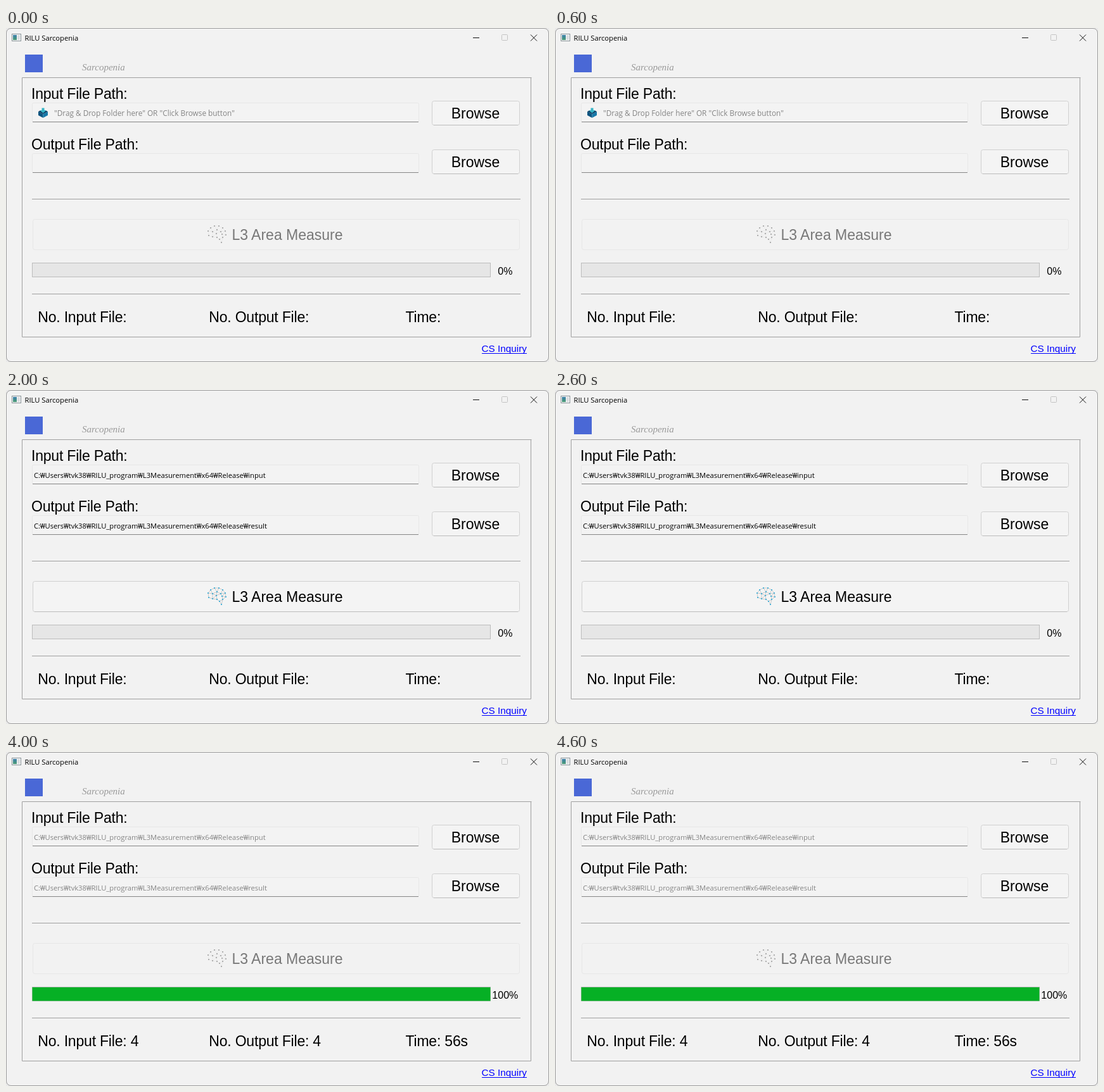
An HTML page for the animation above (5 s loop, 857 by 528 pixels).

```html
<!DOCTYPE html>
<html lang="en">
<head>
<meta charset="utf-8">
<title>Area measurement tool</title>
<style>
  html, body { margin: 0; width: 100%; height: 100%; overflow: hidden; background: #e9e9e9; }
  svg { display: block; width: 857px; height: 528px; font: 23px "Liberation Sans", Arial, sans-serif; }
  .ui { font-family: "Open Sans", "Noto Sans", sans-serif; }
  .label { letter-spacing: -.2px; }
  .path { font-size: 11.2px; }
  .rule { stroke: #a0a0a0; fill: none; }
  .field rect { fill: #f3f3f3; stroke: #e7e7e7; }
  .field path { stroke: #868686; }
  .button { text-anchor: middle; }
  .button rect { fill: #f4f4f4; stroke: #d0d0d0; }
  .button path { stroke: #bcbcbc; }
  .button.off { fill: #787878; }
  .button.off rect { fill: #f2f2f2; stroke: #e7e7e7; }
  .button.off path { stroke: #e7e7e7; }
  #brain { stroke: #1ba6d8; fill: #1ba6d8; stroke-width: .8; }
  .off #brain { stroke: #9b9b9b; fill: #9b9b9b; }
</style>
</head>
<body>
<svg viewBox="0 0 857 528">
  <defs>
    <linearGradient id="pane" x2="0" y2="1">
      <stop stop-color="#3d7fae"/><stop offset="1" stop-color="#4b9b72"/>
    </linearGradient>
    <linearGradient id="sheen" gradientUnits="userSpaceOnUse" x1="160" y1="388" x2="204" y2="376">
      <stop stop-color="#06b025"/><stop offset="1" stop-color="#66dd72"/>
    </linearGradient>
  </defs>

  <!-- window and title bar -->
  <rect x=".5" y=".5" width="856" height="527" rx="7.5" fill="#f2f2f2" stroke="#9c9c9c"/>
  <rect x="9.5" y="9.5" width="14" height="11" fill="#fafafa" stroke="#8a9499"/>
  <rect x="11" y="11" width="6" height="8" fill="url(#pane)"/>
  <rect x="18" y="11" width="4" height="8" fill="#d9dde0"/>
  <text class="ui" x="29.5" y="20" font-size="11.2">RILU Sarcopenia</text>
  <g fill="none" stroke="#111">
    <path d="M737 15.5h10M828 10.5l10 10m0-10l-10 10"/>
    <rect x="782.5" y="10.5" width="9" height="9" rx="1" stroke="#c3c3c3"/>
  </g>

  <!-- heading -->
  <rect x="30" y="42" width="28" height="28" fill="#4a68d6"/>
  <text x="120" y="67" fill="#9a9a9a" style="font:italic 15px 'Liberation Serif',serif">Sarcopenia</text>

  <path class="rule" d="M25.5 78.5H829.5M25.5 78.5V488.5H828.5V78.5M41 270.5H812M41 420.5H812"/>

  <text class="label" x="40" y="112">Input File Path:</text>
  <text class="label" x="40" y="192">Output File Path:</text>
  <g class="field">
    <rect x="41.5" y="118.5" width="610" height="30" rx="2"/><path d="M42 148.5H651"/>
    <rect x="41.5" y="198.5" width="610" height="30" rx="2"/><path d="M42 228.5H651"/>
  </g>
  <g id="hint">
    <path d="M51 132l7.500 4v6l-7.500-4z" fill="#0b5480"/>
    <path d="M66 132l-7.500 4v6l7.500-4z" fill="#1678a8"/>
    <path d="M51 132l3-1.500 4.500 3 4.500-3 3 1.500-7.500 4z" fill="#0a3f66"/>
    <path d="M56.500 126.500h4v3.500h3l-5 4.500-5-4.500h3z" fill="#35b5c6"/>
    <text class="ui" x="76" y="138.500" font-size="11.8" fill="#858585">"Drag &amp; Drop Folder here" OR "Click Browse button"</text>
  </g>
  <text class="ui path" id="input" x="44" y="138.500"/>
  <text class="ui path" id="output" x="44" y="218.500"/>

  <g class="button browse">
    <rect x="672.5" y="115.5" width="138" height="38" rx="3"/><path d="M675 153.5H808"/>
    <text x="741" y="143">Browse</text>
  </g>
  <g class="button browse">
    <rect x="672.5" y="192.5" width="138" height="38" rx="3"/><path d="M675 230.5H808"/>
    <text x="741" y="220">Browse</text>
  </g>
  <g class="button" id="measure">
    <rect x="42.5" y="302.5" width="768" height="48" rx="3"/><path d="M45 350.5H808"/>
    <g id="brain"></g>
    <text x="444" y="335">L3 Area Measure</text>
  </g>

  <!-- progress -->
  <rect x="41.5" y="371.5" width="723" height="22" fill="#e6e6e6" stroke="#bcbcbc"/>
  <rect id="bar" x="41.5" y="372" height="21.500"/>
  <text id="percent" x="787.8" y="390" font-size="16" text-anchor="middle"/>

  <text class="label" id="inCount" x="50.3" y="465"/>
  <text class="label" id="outCount" x="320.3" y="465"/>
  <text class="label" id="time" x="630.5" y="465"/>
  <text x="750.5" y="512" font-size="15.3" fill="#00f">CS Inquiry</text>
  <path d="M751 514.5H822" stroke="#00f"/>
</svg>
<script>
const $ = id => document.getElementById(id);
const folder = "C:₩Users₩tvk38₩RILU_program₩L3Measurement₩x64₩Release₩";

// Each state lasts one second.
const states = [
  { percent: 0 },
  { percent: 0, input: 1 },
  { percent: 0, input: 1, output: 1, ready: 1 },
  { percent: 25, input: 1, output: 1, busy: 1, files: 4, time: "48s" },
  { percent: 100, input: 1, output: 1, done: 4, files: 4, time: "56s" }
];

// Brain icon: nodes joined to their near neighbours.
const nodes = [[319, 321], [323, 316], [329, 313], [336, 313], [342, 316], [346, 321],
  [347, 327], [342, 331], [337, 334], [340, 339], [333, 331], [326, 330], [320, 328],
  [326, 322], [333, 319], [339, 322], [332, 325], [341, 326]];
let links = "";
nodes.forEach(([x, y], i) => nodes.slice(i + 1).forEach(([u, v]) => {
  if (Math.hypot(x - u, y - v) < 8.3) links += `M${x} ${y}L${u} ${v}`;
}));
$("brain").innerHTML = `<path d="${links}"/>` +
  nodes.map(([x, y]) => `<circle cx="${x}" cy="${y}" r="1" stroke="none"/>`).join("");

function show(s) {
  $("hint").style.display = s.input ? "none" : "";
  $("input").textContent = s.input ? folder + "input" : "";
  $("output").textContent = s.output ? folder + "result" : "";
  for (const id of ["input", "output"]) $(id).setAttribute("fill", s.done ? "#858585" : "#000");
  for (const b of document.querySelectorAll(".browse")) b.classList.toggle("off", !!s.busy);
  $("measure").classList.toggle("off", !s.ready);
  $("bar").setAttribute("width", s.percent / 100 * 723 - (s.busy ? 1 : 0) < 0 ? 0 : s.percent / 100 * 723 - (s.busy ? 1 : 0));
  $("bar").setAttribute("fill", s.busy ? "url(#sheen)" : "#06b025");
  $("percent").textContent = s.percent + "%";
  $("inCount").textContent = "No. Input File: " + (s.files || "");
  $("outCount").textContent = "No. Output File: " + (s.done || "");
  $("time").textContent = "Time: " + (s.time || "");
}

let start, current;
function tick(now) {
  start ??= now;
  const next = Math.floor((now - start) / 1000) % states.length;
  if (next !== current) show(states[current = next]);
  requestAnimationFrame(tick);
}
show(states[0]);
requestAnimationFrame(tick);
</script>
</body>
</html>
```
